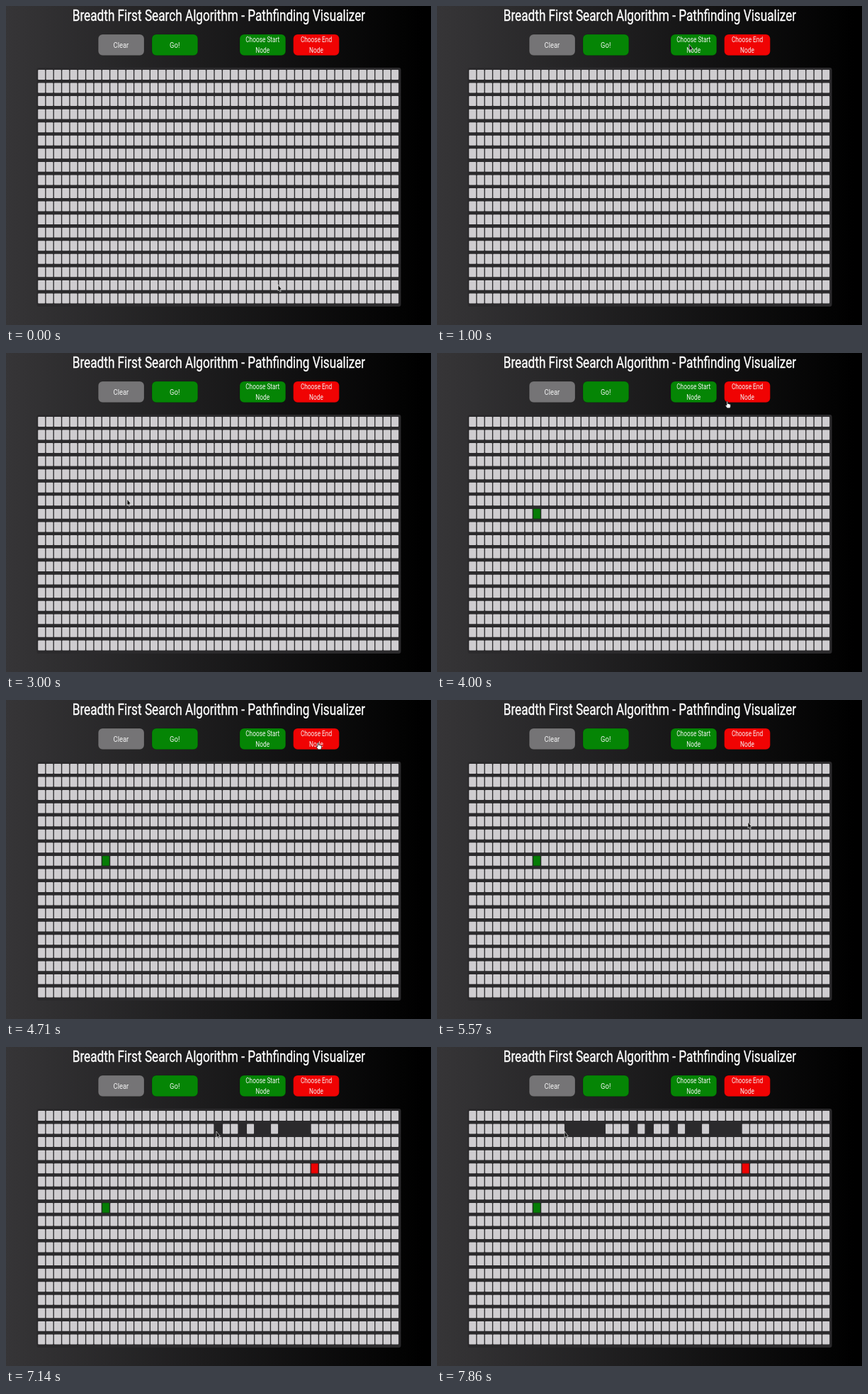
An HTML page that plays this animation: 600 px wide and 450 px high, repeating every 8 s.

```html
<!DOCTYPE html>
<html lang="en">
<head>
<meta charset="utf-8">
<title>Pathfinding Visualizer</title>
<style>
  html, body { margin: 0; width: 100%; height: 100%; overflow: hidden; background: #000; }
  svg { display: block; width: 600px; height: 450px; }
  text { font-family: Roboto, Arial, sans-serif; fill: #f4f4f4; text-anchor: middle; }
  .title { font-size: 21.5px; fill: #fff; stroke: #fff; stroke-width: .35px; }
  .big { font-size: 11.8px; }
  .small { font-size: 10.4px; }
  .button { stroke: #000; stroke-opacity: .25; stroke-width: .8px; }
  .cell { fill: #cfcdd0; }
  .start { fill: #067d06; stroke: #0b4a0b; stroke-width: .6px; }
  .end { fill: #ee0303; stroke: #7a1010; stroke-width: .6px; }
  .wall { fill: none; }
</style>
</head>
<body>
<svg viewBox="0 0 600 450">
  <defs>
    <linearGradient id="back">
      <stop offset="0" stop-color="#363537"/>
      <stop offset=".98" stop-color="#000"/>
    </linearGradient>
  </defs>
  <rect width="600" height="450" fill="url(#back)"/>
  <rect x="43.5" y="87" width="514" height="337" rx="3" fill="#2b2a2c"/>
  <g id="grid"></g>
  <g class="buttons">
    <rect class="button" x="130.2" y="40" width="64.8" height="29.7" rx="6" fill="#757476"/>
    <rect class="button" x="206" y="40" width="64.8" height="29.7" rx="6" fill="#058505"/>
    <rect class="button" x="330" y="40" width="64.8" height="29.7" rx="6" fill="#058505"/>
    <rect class="button" x="405.6" y="40" width="64.8" height="29.7" rx="6" fill="#f00303"/>
  </g>
  <!-- the whole page is seen slightly narrowed -->
  <g transform="scale(.8 1)">
    <text class="title" x="375.6" y="21.5">Breadth First Search Algorithm - Pathfinding Visualizer</text>
    <text class="big" x="203" y="59">Clear</text>
    <text class="big" x="297.8" y="59">Go!</text>
    <text class="small" x="452.8" y="51.5">Choose Start</text>
    <text class="small" x="452.8" y="66">Node</text>
    <text class="small" x="547.5" y="51.5">Choose End</text>
    <text class="small" x="547.5" y="66">Node</text>
  </g>
  <g id="cursor">
    <path id="arrow" d="M0 0V8.8L1.6 7.4L2.8 10.2L4.2 9.6L3 6.9L5.2 6.6Z" fill="#111" stroke="#fff" stroke-width=".6"/>
    <path id="hand" d="M0 .6Q.8-.4 1.5.6V3.6Q3 3 3.4 4Q5.4 3.8 5.5 5.2V7.4L4.6 9.8H.6L-1.8 6.2Q-1.6 4.8 0 5.8Z" fill="#fff" stroke="#111" stroke-width=".7"/>
  </g>
</svg>
<script>
const LOOP = 8000, STEP = 1000 / 7;
const COLS = 45, ROWS = 18, X0 = 45.2, Y0 = 90, DX = 11.34, DY = 18.56;
const START = [8, 7], END = [34, 4];
const WALL_ROW = 1, WALLS = [33, 32, 31, 30, 28, 27, 25, 22, 20, 16, 15, 14, 13, 12];
const START_AT = 23, END_AT = 43, DRAG_AT = 47;

// pointer path: step, x, y
const PATH = [
  [0, 384, 393], [1, 378, 313], [3, 366, 180], [5, 359, 90], [7, 356, 54],
  [11, 357, 55], [12, 360, 55], [16, 360, 55], [17, 340, 75], [20, 200, 190],
  [22, 142, 222], [25, 140, 223], [28, 409, 68], [31, 440, 60], [33, 440, 60],
  [36, 444, 140], [38, 440, 186], [39, 439, 172], [42, 438, 172], [44, 430, 130],
  [45, 424, 110], [46, 420, 118], [47, 410, 118], [48, 388, 117], [49, 331, 118],
  [50, 297, 119], [51, 274, 120], [52, 232, 121], [53, 210, 121], [54, 195, 120],
  [55, 180, 119]
];

const byId = id => document.getElementById(id);
const grid = byId('grid'), cursor = byId('cursor'), arrow = byId('arrow'), hand = byId('hand');
const cells = [];

for (let r = 0; r < ROWS; r++) {
  for (let c = 0; c < COLS; c++) {
    const cell = document.createElementNS(grid.namespaceURI, 'rect');
    const attrs = { x: X0 + c * DX, y: Y0 + r * DY, width: 10, height: 13.9, rx: .9, class: 'cell' };
    for (const name in attrs) cell.setAttribute(name, attrs[name]);
    grid.append(cell);
    cells.push(cell);
  }
}

function paint(col, row, on, kind) {
  cells[row * COLS + col].setAttribute('class', on ? kind : 'cell');
}

function pointerAt(step) {
  const i = Math.max(1, PATH.findIndex(p => p[0] >= step));
  const [s0, x0, y0] = PATH[i - 1], [s1, x1, y1] = PATH[i];
  const k = (step - s0) / (s1 - s0);
  return [x0 + (x1 - x0) * k, y0 + (y1 - y0) * k];
}

function draw(step) {
  const [x, y] = pointerAt(step);
  const pointing = (step >= 12 && step <= 16) || (step >= 28 && step <= 33);
  cursor.setAttribute('transform', `translate(${x} ${y})`);
  arrow.style.display = pointing ? 'none' : '';
  hand.style.display = pointing ? '' : 'none';
  paint(...START, step >= START_AT, 'start');
  paint(...END, step >= END_AT, 'end');
  for (const col of WALLS) {
    paint(col, WALL_ROW, step >= DRAG_AT && x < X0 + (col + 1) * DX, 'wall');
  }
}

let shown = -1;
function tick() {
  const time = performance.now() % LOOP;
  const step = Math.min(55, Math.floor((time + 5) / STEP));
  if (step !== shown) draw(shown = step);
  requestAnimationFrame(tick);
}
tick();
</script>
</body>
</html>
```
